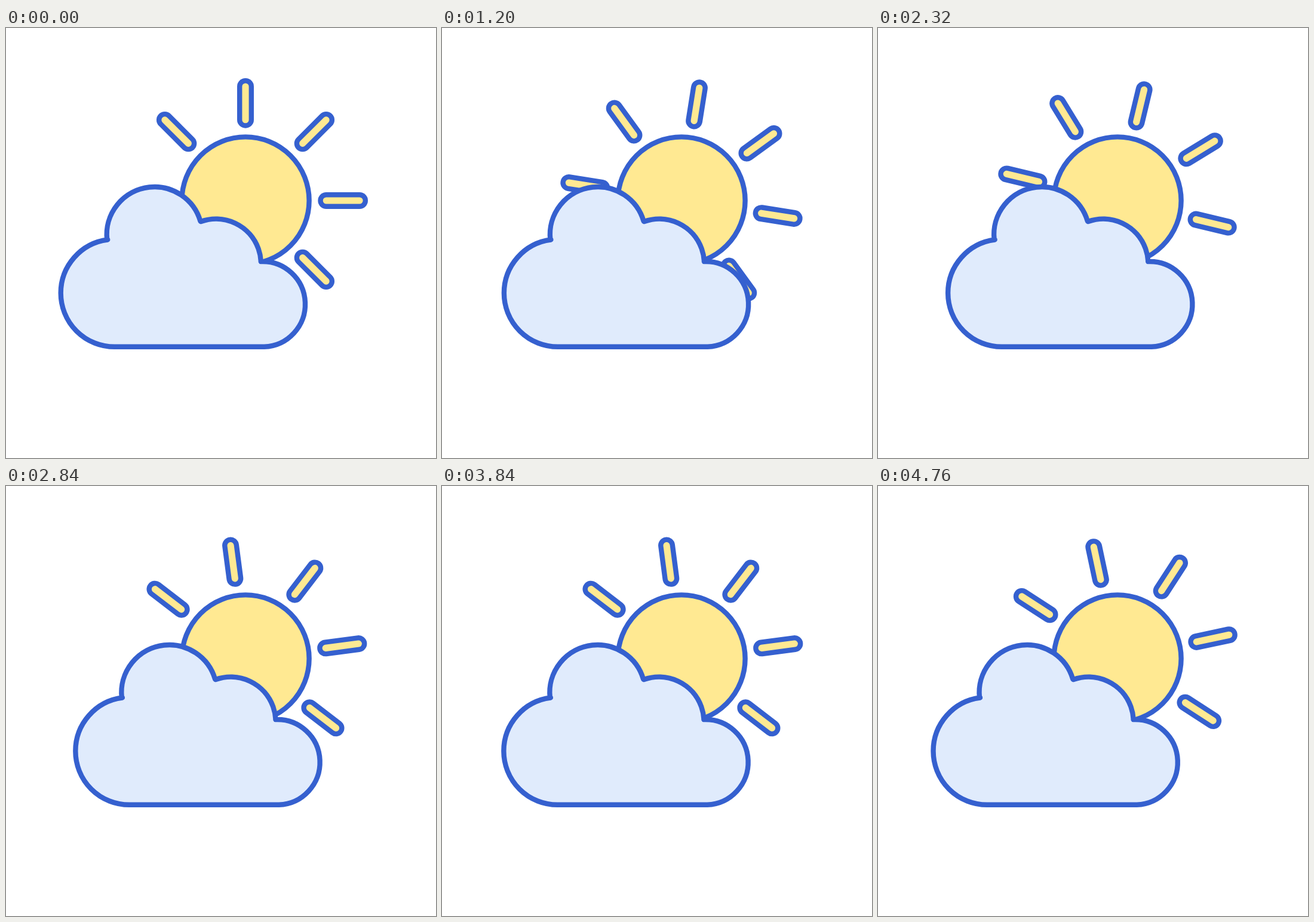
Animation of 720 by 720 pixels, one loop 4.8 s. Source, as an HTML page with a canvas:

```html
<!DOCTYPE html>
<html lang="en">
<head>
<meta charset="utf-8">
<title>Sun and cloud</title>
<style>
  html, body { margin: 0; width: 100%; height: 100%; overflow: hidden; background: #fff; }
  canvas { display: block; width: 720px; height: 720px; }
</style>
</head>
<body>
<canvas id="stage" width="720" height="720"></canvas>
<script>
const ctx = document.getElementById('stage').getContext('2d');
const BLUE = '#3560cf', YELLOW = '#ffe992', SKY = '#e0ebfc';
const LINE = 8.4, LOOP = 4800, STEP = 40, RATE = 30;
const SUN = { x: 401, y: 289, r: 106.6 };
const RAY_WIDTH = 28;
const DRIFT = 25.9, HALF_DRIFT = 2.5, SPIN = 45;

// Lobes run clockwise from the lower left: centre, radius, start point, end point.
const LOBES = [
  [181.7, 443.8, 90, 181.7, 533.8, 170.2, 354.5],
  [248.7, 346, 80, 170.2, 354.5, 326.2, 323.5],
  [351.7, 395, 75.3, 326.2, 323.5, 426.7, 391],
  [429.6, 462.4, 71.4, 426.7, 391, 429.6, 533.8]
];

const smooth = u => u * u * (3 - 2 * u);

function paint(fill) {
  ctx.fillStyle = fill;
  ctx.strokeStyle = BLUE;
  ctx.lineWidth = LINE;
  ctx.fill();
  ctx.stroke();
}

function drawRays(degrees) {
  for (let i = 0; i < 8; i++) {
    ctx.save();
    ctx.translate(SUN.x, SUN.y);
    ctx.rotate((degrees + i * 45) * Math.PI / 180);
    ctx.beginPath();
    ctx.moveTo(135.3, 0);
    ctx.lineTo(191, 0);
    for (const [color, width] of [[BLUE, RAY_WIDTH], [YELLOW, RAY_WIDTH - 2 * LINE]]) {
      ctx.strokeStyle = color;
      ctx.lineWidth = width;
      ctx.stroke();
    }
    ctx.restore();
  }
}

function drawSun() {
  ctx.beginPath();
  ctx.arc(SUN.x, SUN.y, SUN.r, 0, Math.PI * 2);
  paint(YELLOW);
}

function drawCloud(shift) {
  ctx.save();
  ctx.translate(shift, 0);
  ctx.beginPath();
  for (const [x, y, r, x0, y0, x1, y1] of LOBES) {
    ctx.arc(x, y, r, Math.atan2(y0 - y, x0 - x), Math.atan2(y1 - y, x1 - x));
  }
  ctx.closePath();
  paint(SKY);
  ctx.restore();
}

// Motion advances at 30 poses per second, shown in 40 ms steps.
function render(ms) {
  const shown = Math.floor((ms % LOOP) / STEP + 1e-4) * STEP;
  const seconds = Math.floor(shown * RATE / 1000 + 1e-4) / RATE;
  const phase = seconds / HALF_DRIFT;
  ctx.fillStyle = '#fff';
  ctx.fillRect(0, 0, 720, 720);
  drawRays(SPIN * seconds);
  drawSun();
  drawCloud(DRIFT * smooth(phase < 1 ? phase : 2 - phase));
}

ctx.lineCap = ctx.lineJoin = 'round';
let start;
function tick(now) {
  start ??= now;
  render(Math.max(0, now - start));
  requestAnimationFrame(tick);
}
render(0);
requestAnimationFrame(tick);
</script>
</body>
</html>
```
